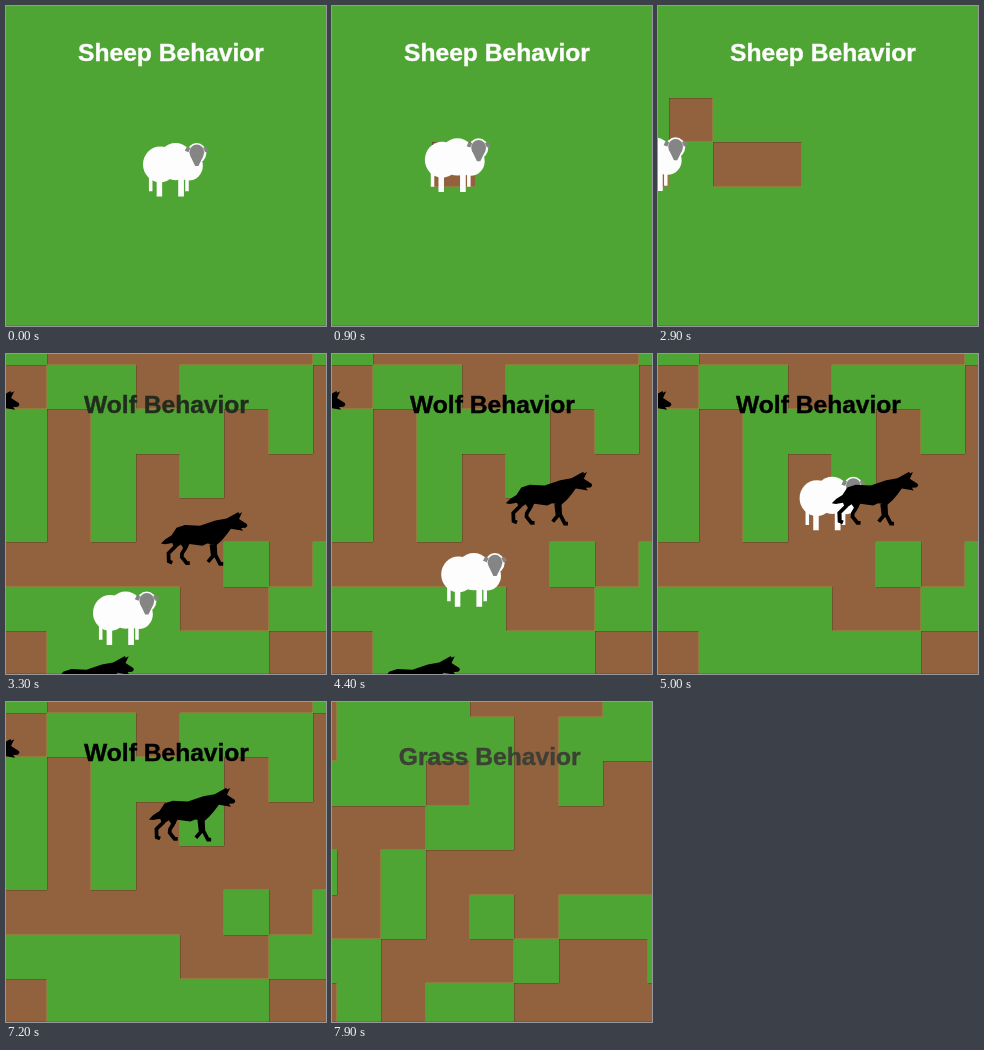
Recreate the animation shown at these times as an HTML page with a canvas. Size 320 by 320 pixels, loop 8000 ms.

```html
<!DOCTYPE html>
<html lang="en">
<head>
<meta charset="utf-8">
<title>Grazing world</title>
<style>
  html, body { margin: 0; width: 100%; height: 100%; overflow: hidden; background: #4fa533; }
  canvas { display: block; width: 320px; height: 320px; }
</style>
</head>
<body>
<canvas id="stage" width="320" height="320"></canvas>
<script>
const ctx = document.getElementById('stage').getContext('2d');
const LOOP = 8000, TILE = 44.4;
const GREEN = '#4fa533', BROWN = '#92623e', GREY = '#858585', WHITE = '#fdfdfd';

// Ground layouts: '#' is bare soil, '.' is grass.
const wolfLand = '.######. #..#...# .#...#.# .#.#.### .#.##### #####.#. ....##.. #.....##'.split(' ');
const grassLand = '#...###.. #....#... ...#.#.## ###..#### .#.###### ##.#.#... ..###.##. #.#..####'.split(' ');

const wolfBody = new Path2D('M-1 195 14 180 36 166 53 140 82 131 134 133 188 115 227 108 268 86 270 92 281 87 270 110 297 127 299 134 293 140 277 141 284 151 242 144 227 164 210 184 192 200 160 195 143 202 98 196 84 222 68 198 46 213 38 193 13 197Z');
const wolfLegs = new Path2D('M50 204 25 228 26 256 38 261M88 202 72 229 71 241 88 262H99M174 197 179 238 162 258M186 197 188 234 204 265H215');
const sheepLegs = new Path2D('M65 215h25v83H65zM163 215h26v83h-26zM30 205h16v70H30zM195 205h16v70h-16z');
const sheepFace = new Path2D('M218 120 240 165H255L278 120zM276 85 285 105 302 99 294 83zM219 85 210 105 193 99 201 83z');

function disc(x, y, size, color) {
  ctx.fillStyle = color;
  ctx.beginPath();
  ctx.arc(x + size / 2, y + size / 2, size / 2, 0, 7);
  ctx.fill();
}

function rect(x, y, w, h, color) {
  ctx.fillStyle = color;
  ctx.fillRect(x, y, w, h);
}

// Draws a 300-unit shape with its (left, top) corner at (x, y).
function place([x, y], scaleX, scaleY, left, top, draw) {
  ctx.save();
  ctx.translate(x, y);
  ctx.scale(scaleX, scaleY);
  ctx.translate(-left, -top);
  draw();
  ctx.restore();
}

function sheep(at) {
  place(at, 0.22, 0.23, 3, 65, () => {
    disc(203, 65, 88, WHITE);
    disc(70, 65, 162, WHITE);
    disc(147, 100, 128, WHITE);
    disc(3, 80, 156, WHITE);
    ctx.fill(sheepLegs);
    disc(214, 72, 67, GREY);
    ctx.fill(sheepFace);
  });
}

function wolf(at) {
  place(at, 0.288, 0.29, -1, 86, () => {
    ctx.fillStyle = ctx.strokeStyle = '#000';
    ctx.lineWidth = 13;
    ctx.fill(wolfBody);
    ctx.stroke(wolfLegs);
  });
}

// Every heading moves the animal forward by one tile.
function walk(start, headings, steps) {
  return headings.slice(0, steps).reduce(([x, y], degrees) => {
    const a = degrees * Math.PI / 180;
    return [x + TILE * Math.cos(a), y + TILE * Math.sin(a)];
  }, start);
}

function land(x0, y0, isSoil) {
  const dark = 'rgba(40,50,15,.3)', light = 'rgba(140,175,65,.35)';
  const edgeX = c => Math.floor(x0 + c * TILE), edgeY = r => Math.floor(y0 + r * TILE);
  rect(0, 0, 320, 320, GREEN);
  for (let r = 0; r < 8; r++) {
    for (let c = 0; c < 9; c++) {
      if (!isSoil(c, r)) continue;
      const x = edgeX(c), y = edgeY(r), w = edgeX(c + 1) - x, h = edgeY(r + 1) - y;
      rect(x, y, w, h, BROWN);
      if (!isSoil(c - 1, r)) rect(x, y, 1, h, dark);
      if (!isSoil(c, r - 1)) rect(x, y, w, 1, dark);
      if (!isSoil(c + 1, r)) rect(x + w - 1, y, 1, h, light);
      if (!isSoil(c, r + 1)) rect(x, y + h - 1, w, 1, light);
    }
  }
}

const clamp = (v, max) => Math.max(0, Math.min(max, v));
const fromMap = map => (c, r) => {
  const row = map[clamp(r, map.length - 1)];
  return row[clamp(c, row.length - 1)] === '#';
};

function title(text, x, y, color) {
  ctx.font = 'bold 24.6px "Liberation Sans", Helvetica, Arial, sans-serif';
  ctx.textAlign = 'center';
  ctx.fillStyle = ctx.strokeStyle = color;
  ctx.lineWidth = 0.4;
  ctx.fillText(text, x, y);
  ctx.strokeText(text, x, y);
}

function sheepScene(t) {
  const x0 = -33.1, y0 = 3.5, start = [137, 137], headings = [186, 191, 190, 160];
  const steps = Math.max(0, Math.floor((t - 100) / 650));
  const eaten = new Set();
  for (let n = 1; n <= steps; n++) {
    const [x, y] = walk(start, headings, n);
    eaten.add([Math.floor((x + 33 - x0) / TILE), Math.floor((y + 19 - y0) / TILE)].join());
  }
  land(x0, y0, (c, r) => eaten.has(c + ',' + r));
  sheep(walk(start, headings, steps));
  title('Sheep Behavior', 165, 55.3, WHITE);
}

function wolfScene(t) {
  const tick = Math.floor(t / 560);
  land(-3.1, -33.1, fromMap(wolfLand));
  if (tick < 4) sheep(walk([87, 237.5], [-60, -46, -88], tick));
  wolf([-73, 37]);
  if (tick < 2) wolf([41.5, 302]);
  wolf(walk([155, 158], [-65, -134], tick < 5 ? Math.min(tick, 1) : 2));
  title('Wolf Behavior', 160.5, 58.8, tick ? '#000' : '#222c1e');
}

function grassScene() {
  land(-39.1, -28.9, fromMap(grassLand));
  title('Grass Behavior', 157.7, 63, '#3c4035');
}

function frame(now) {
  const t = now % LOOP;
  if (t < 3300) sheepScene(t);
  else if (t < 7300) wolfScene(t - 3300);
  else grassScene();
  rect(0, 319, 320, 1, 'rgba(0,0,0,.12)');
  requestAnimationFrame(frame);
}
requestAnimationFrame(frame);
</script>
</body>
</html>
```
